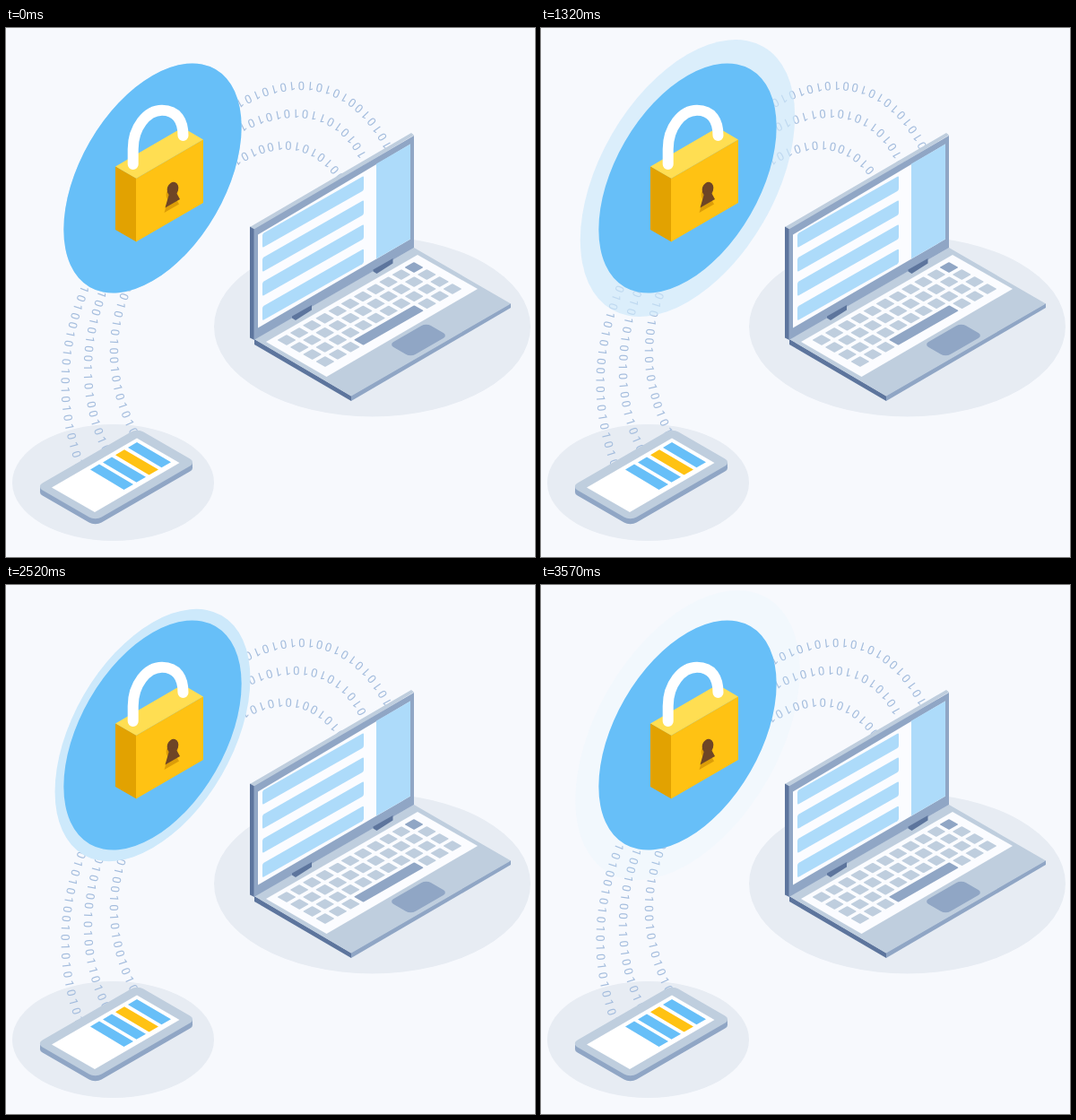
An HTML page that plays this animation: 590 by 590 pixels, repeating every 3600 ms.

```html
<!DOCTYPE html>
<html lang="en">
<head>
<meta charset="utf-8">
<title>Secure transfer</title>
<style>
  html, body { margin: 0; width: 100%; height: 100%; overflow: hidden; background: #f7f9fd; }
  svg { display: block; width: 590px; height: 590px; }
  .bits { font: 13.2px Roboto, Arial, sans-serif; letter-spacing: 3.19px; fill: #a3bcdd; }
  .shadow { fill: #e7ecf3; }
  .light { fill: #bfcede; }
  .mid { fill: #90a6c5; }
  .dark { fill: #5d759d; }
  .white { fill: #fbfcff; }
  .blue { fill: #67bff8; }
  .pale { fill: #addbfa; }
  .gold { fill: #ffc213; }
</style>
</head>
<body>
<svg viewBox="0 0 590 590">
  <defs>
    <path id="bar" d="M286 231.500q0-2 1.700-3L397.500 165.700q1.500-.8 1.500 1V179q0 2-1.600 3L287.500 244.300q-1.500.8-1.500-1z"/>
    <path id="stripe" d="M136 468l10-6 38 22.300-10.500 6z"/>
    <path id="hinge" d="M319 321.500l22-12.500v5.500L323 326l-4-2.500z"/>
    <rect id="slab" x="-65" y="-38" width="130" height="76" rx="8"/>
    <g id="hole">
      <ellipse cx="186" cy="179.500" rx="6.200" ry="7.800" transform="rotate(18 186 179.500)"/>
      <path d="M182.500 183l-5 17.500 16.500-9.500-5.500-10z"/>
    </g>
  </defs>

  <ellipse class="shadow" cx="408.500" cy="333" rx="176.500" ry="100.500"/>
  <ellipse class="shadow" cx="119.500" cy="507" rx="112.500" ry="65"/>
  <g id="streams" class="bits"></g>

  <!-- Lock -->
  <g transform="matrix(.866 -.5 0 1 163.500 167.500)">
    <circle id="pulse" r="114.500" fill="#cde9fb"/>
    <circle class="blue" r="114.500"/>
  </g>
  <path fill="#ffde52" d="M122 154.500L197 111l23 13.500L145 168z"/>
  <path fill="#e2a201" d="M122 154.500L145.500 168v70.500L122 225z"/>
  <path class="gold" d="M145 168l75-43.500V195l-75 43.500z"/>
  <path d="M141.700 152V135C141.700 111 157 91.700 174 91.700S197.500 104 197.500 120"
        fill="none" stroke="#fff" stroke-width="12" stroke-linecap="round"/>
  <use href="#hole" x="-1" y="5.500" fill="#dc9d08"/>
  <use href="#hole" fill="#6e4526"/>

  <!-- Laptop -->
  <path class="dark" d="M277 347l108 63.500v5.500L277 353z"/>
  <path class="mid" d="M385 410l178-103v5L385 416z"/>
  <path class="light" d="M277 347l178-102 108 62.500-178 103z"/>
  <path class="light" d="M272 222l180-105 3 2.500L277 226z"/>
  <path class="dark" d="M272 221.500l5 3V348l-5-2.500z"/>
  <path class="mid" d="M276.500 224.500L455 120v125L276.500 348z"/>
  <path class="white" d="M281 230.500l170-101V235.500L281 334.500z"/>
  <g class="pale">
    <use href="#bar"/>
    <use href="#bar" y="27"/>
    <use href="#bar" y="54"/>
    <use href="#bar" y="81.300"/>
    <path d="M413 151.500l38-22v106L413 257.500z"/>
  </g>
  <path class="white" d="M290 350l169-97 67 38-168.500 98z"/>
  <g id="keys" transform="matrix(14.200 -8.100 14.300 8 313 348)"></g>
  <rect class="mid" x="-24" y="-14" width="48" height="28" rx="6" transform="matrix(.866 -.5 .866 .5 460 348)"/>
  <use href="#hinge" class="dark"/>
  <use href="#hinge" class="dark" x="90.500" y="-52"/>

  <!-- Phone -->
  <g class="mid">
    <use href="#slab" transform="matrix(.866 -.5 .866 .5 123 504)"/>
    <path d="M38 511.500L208 484.500v6L38 517.500z"/>
  </g>
  <use href="#slab" class="light" transform="matrix(.866 -.5 .866 .5 123 498)"/>
  <path fill="#fff" d="M51 512.500L146 457.500l47.500 27.500L99 540z"/>
  <use href="#stripe" class="blue"/>
  <use href="#stripe" class="gold" x="-14" y="8.200"/>
  <use href="#stripe" class="blue" x="-28" y="16.400"/>
  <use href="#stripe" class="blue" x="-42" y="24.600"/>
</svg>
<script>
const NS = 'http://www.w3.org/2000/svg';
const HALF = 1800, TRAVEL = 67;

const byId = id => document.getElementById(id);
const add = (parent, tag, attrs, text = '') => {
  const el = document.createElementNS(NS, tag);
  for (const k in attrs) el.setAttribute(k, attrs[k]);
  el.textContent = text;
  return parent.appendChild(el);
};

// Digit streams: baseline, start offset, digits
const ones = n => '10'.repeat(n), zeros = n => '01'.repeat(n);
const streams = [
  ['M438 148C412 84 352 22 244 88', -88, ones(8) + zeros(9)],
  ['M410 163C392 99 330 61 238 120', -73, '101010101' + '1010101' + ones(8)],
  ['M390 187C358 121 305 106 238 156', -72, ones(5) + '010101010' + zeros(6)],
  ['M95.5 262C53 350 51 425 85.5 508', -58, ones(6) + zeros(12)],
  ['M114.5 268C79 340 75 420 118 492', -69, '01010101010' + '0101001' + '10100' + ones(6)],
  ['M142.5 266C105 330 107 401 148 471', -85, '01010101010' + '0101010' + zeros(8)]
].map(([d, start, digits], i) => {
  const g = byId('streams');
  add(g, 'path', { id: 'lane' + i, d, fill: 'none' });
  const text = add(g, 'text', {});
  return { start, el: add(text, 'textPath', { href: '#lane' + i }, digits) };
});

// Keyboard: four rows of eleven, with a space bar in the front row
const key = (col, row, span = 1, cls = 'light') => add(byId('keys'), 'rect', {
  x: col - .37, y: row - .37, width: span - .26, height: .74, rx: .06, class: cls
});
for (let row = 0; row < 4; row++)
  for (let col = 0; col < 11; col++) {
    if (row === 3 && col > 2 && col < 8) continue;
    key(col, row, 1, row === 0 && col === 10 ? 'mid' : 'light');
  }
key(3, 3, 5, 'mid');

const ease = u => u - .048 * Math.sin(2 * Math.PI * u);
const pulse = byId('pulse');

function draw(ms) {
  const u = ms % HALF / HALF;
  pulse.setAttribute('r', 114.5 * (1 + .265 * ease(u)));
  pulse.setAttribute('opacity', u < .58 ? 1 : 1 - .92 * (u - .58) / .42);

  const back = ms % (2 * HALF) >= HALF;
  const shift = TRAVEL * ease(back ? 1 - u : u);
  for (const s of streams) s.el.setAttribute('startOffset', s.start + shift);
}

let t0;
function tick(now) {
  t0 ??= now;
  draw(now - t0);
  requestAnimationFrame(tick);
}
draw(0);
requestAnimationFrame(tick);
</script>
</body>
</html>
```
